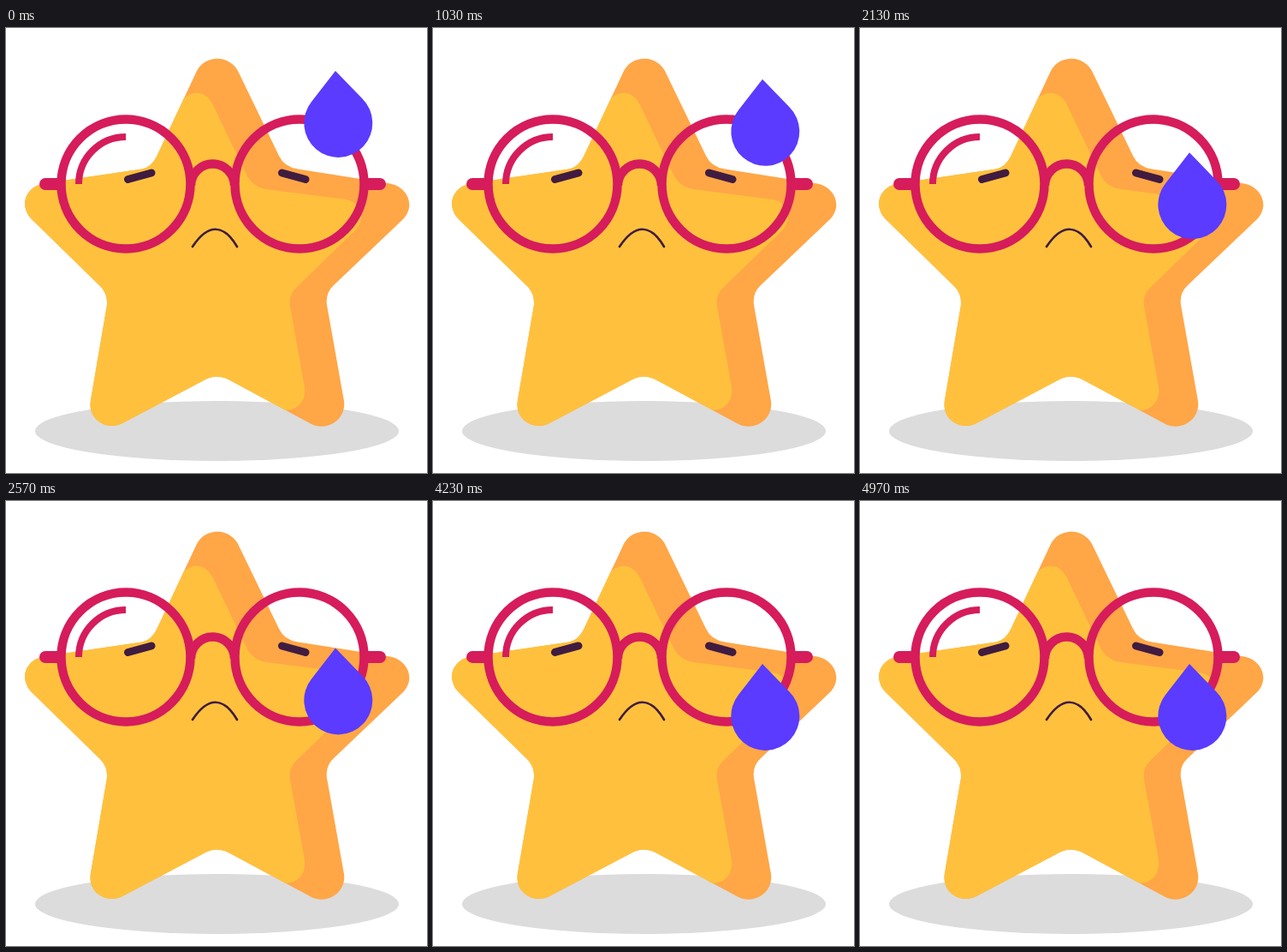
These frames come from a looping animation (492 px wide and 519 px high, 8.41 s). An HTML page:

```html
<!DOCTYPE html>
<html lang="en">
<head>
<meta charset="utf-8">
<title>Tired star</title>
<style>
  html, body { margin: 0; width: 100%; height: 100%; overflow: hidden; background: #fff; }
  svg { display: block; width: 100%; height: 100%; }
</style>
</head>
<body>
<svg viewBox="0 0 492 519" fill="none">
  <defs>
    <clipPath id="starClip"><use href="#star"/></clipPath>
  </defs>
  <ellipse cx="246.5" cy="470" rx="212.5" ry="35" fill="#dcdcdc"/>
  <path id="star" fill="#ffa647" d="M223 50C233 31 261 31 271 50L319 149Q325 162 341 164.500L446 181C470 184 479 208 464 223L383 300Q373 309 375 323L395 435C398 457 375 471 357 462L262 411Q246 402 231 411L136 461C118 470 95 457 99 434L118 323Q119 311 111 302L30 223C14 206 24 184 46 181L159 164.500Q170 162 176 150Z"/>
  <path clip-path="url(#starClip)" fill="#ffc13d" d="M208 82C220 71 235 75 242 90L280 169Q287 185 304 188L397 200C414 203 421 220 409 235L338 304Q330 312 332 325L349 419C351 437 339 446 326 446V520H0V82Z"/>
  <path stroke="#401c40" stroke-width="2.7" stroke-linecap="round" d="M218 255C236 228 254 228 270 255"/>
  <path id="eyes" stroke="#401c40" stroke-width="9" stroke-linecap="round" d="M142.500 176.500L170 169M322.500 169L350 176.500"/>
  <g id="glasses" stroke="#d61c5b" stroke-width="10.5">
    <circle cx="140" cy="182" r="75.500"/>
    <circle cx="343" cy="182" r="75.500"/>
    <path d="M216 184A25.500 25.500 0 0 1 267 184"/>
    <path stroke-width="14" stroke-linecap="round" d="M46 182H61M422 182H437"/>
    <path stroke-width="8" d="M85 182A55 55 0 0 1 140 127"/>
  </g>
  <path id="drop" fill="#5a3bff" d="M385 50L416.500 82.500A40 40 0 1 1 357 86Z"/>
</svg>
<script>
  const LOOP = 8410;
  const [eyes, glasses, drop] = ['eyes', 'glasses', 'drop'].map(id => document.getElementById(id));

  const progress = (t, from, to) => Math.min(1, Math.max(0, (t - from) / (to - from)));
  const smooth = p => p * p * (3 - 2 * p);
  const bezier = (a, b, s) => 3 * a * s * (1 - s) ** 2 + 3 * b * s * s * (1 - s) + s ** 3;

  // Linear departure, soft arrival.
  function settle(p) {
    let low = 0, high = 1;
    for (let i = 0; i < 24; i++) {
      const mid = (low + high) / 2;
      if (bezier(1 / 6, 2 / 3, mid) < p) low = mid; else high = mid;
    }
    return bezier(1 / 6, 1, low);
  }

  const bump = t => smooth(progress(t, 15, 335)) - smooth(progress(t, 335, 770));
  const shift = (node, y) => node.setAttribute('transform', `translate(0 ${y.toFixed(3)})`);

  function draw(t) {
    const lift = bump(t) + bump(t - 4200);
    shift(glasses, -12.2 * lift);
    shift(eyes, -6.6 * lift);
    shift(drop, t < 890 ? 0 : 140 * settle(progress(t, 890, 3200)));
  }

  const start = performance.now();
  function tick() {
    draw((performance.now() - start) % LOOP);
    requestAnimationFrame(tick);
  }
  tick();
</script>
</body>
</html>
```
